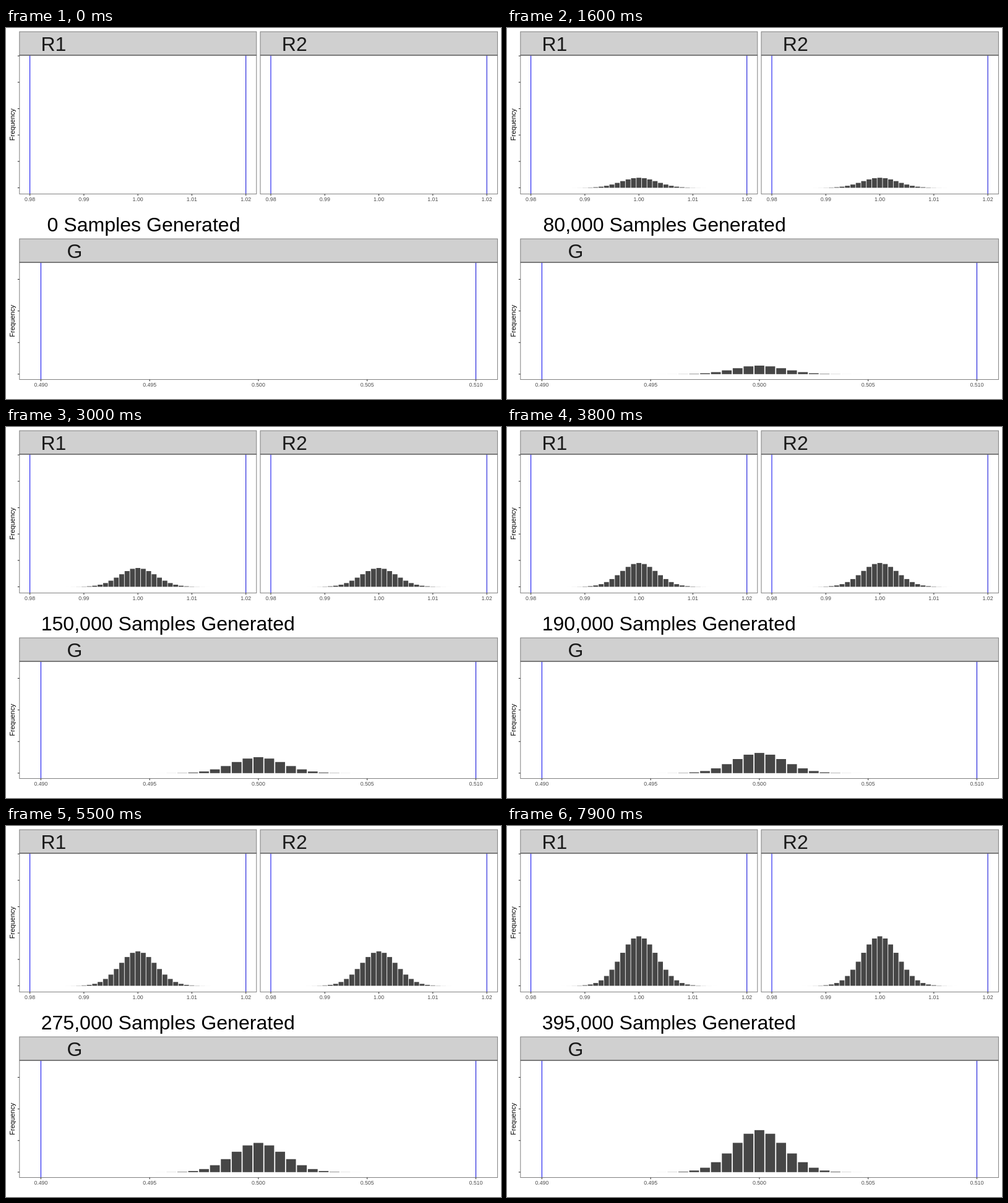
An HTML page that plays this animation: 800x600 px, repeating every 8000 ms.

```html
<!DOCTYPE html>
<html lang="en">
<head>
<meta charset="utf-8">
<title>Samples</title>
<style>
html, body { margin: 0; width: 100%; height: 100%; overflow: hidden; background: #fff; }
svg { display: block; width: 800px; height: 600px; font-family: "Liberation Sans", Arial, sans-serif; }
</style>
</head>
<body>
<svg id="stage" viewBox="0 0 800 600"></svg>
<script>
const stage = document.getElementById("stage");
const LOOP = 8000, STEP = 100, SAMPLES_PER_STEP = 5000;

function add(tag, attrs, text) {
  const el = document.createElementNS("http://www.w3.org/2000/svg", tag);
  for (const key in attrs) el.setAttribute(key, attrs[key]);
  if (text !== undefined) el.textContent = text;
  stage.appendChild(el);
  return el;
}

function line(x1, y1, x2, y2, stroke, width = 1.07) {
  add("line", { x1, y1, x2, y2, stroke, "stroke-width": width });
}

const resistor = {
  top: 6, bottom: 268.4, base: 258.4, tickGap: 42.65, tickCount: 6,
  binWidth: 8.73, sigma: 3.333, peak: 0.2025, reach: 14,
  labels: ["0.98", "0.99", "1.00", "1.01", "1.02"]
};
const panels = [
  { ...resistor, title: "R1", titleX: 56.5, left: 21.8, right: 404.8,
    first: 38.6, last: 387.7, showY: true },
  { ...resistor, title: "R2", titleX: 445.8, left: 411, right: 794.4,
    first: 428, last: 777.1 },
  { title: "G", titleX: 98.5, left: 21.8, right: 794.4, top: 341, bottom: 568.5,
    first: 56.4, last: 759.4, base: 559.8, tickGap: 51.1, tickCount: 4,
    binWidth: 17.575, sigma: 2.357, peak: 0.172, reach: 10, showY: true,
    labels: ["0.490", "0.495", "0.500", "0.505", "0.510"] }
];

function buildPanel(p) {
  const { left, right, top, bottom, first, last } = p;
  const width = right - left, bodyTop = top + 38;

  // Bars: gaussian bins, each filling 90% of its slot.
  const bars = [];
  for (let k = -p.reach; k <= p.reach; k++) {
    const share = Math.exp(-k * k / (2 * p.sigma ** 2)) * p.peak;
    const x = (first + last) / 2 + (k - 0.45) * p.binWidth;
    bars.push({ share, el: add("rect", { x, width: p.binWidth * 0.9, fill: "#464646" }) });
  }

  line(first, bodyTop, first, bottom, "#1010f0");
  line(last, bodyTop, last, bottom, "#1010d8");
  add("rect", { x: left, y: bodyTop, width, height: bottom - bodyTop,
    fill: "none", stroke: "#7f7f7f" });
  add("rect", { x: left, y: top, width, height: 38, fill: "#d0d0d0", stroke: "#7f7f7f" });
  line(left, bodyTop, right, bodyTop, "#555");
  add("text", { x: p.titleX, y: top + 31, "font-size": 32, fill: "#1a1a1a" }, p.title);

  p.labels.forEach((label, i) => {
    const x = first + (last - first) * i / (p.labels.length - 1);
    line(x, bottom, x, bottom + 2.8, "#333");
    add("text", { x, y: bottom + 11.6, "font-size": 8.8, fill: "#4d4d4d",
      "text-anchor": "middle" }, label);
  });

  if (p.showY) {
    for (let i = 0; i < p.tickCount; i++) {
      const y = p.base - i * p.tickGap;
      line(left - 3, y, left, y, "#333");
    }
    const middle = (bodyTop + bottom) / 2;
    add("text", { transform: `translate(13.6 ${middle}) rotate(-90)`, "font-size": 11,
      "text-anchor": "middle" }, "Frequency");
  }

  return thousands => bars.forEach(({ share, el }) => {
    const height = share * thousands;
    el.setAttribute("y", p.base - height);
    el.setAttribute("height", height);
  });
}

const updaters = panels.map(buildPanel);
const caption = add("text", { y: 329, "font-size": 32.1 });
let shown = -1;

function render(time) {
  const step = Math.floor((time % LOOP) / STEP);
  if (step === shown) return;
  shown = step;
  const samples = step * SAMPLES_PER_STEP;
  updaters.forEach(update => update(samples / 1000));
  caption.textContent = samples.toLocaleString("en-US") + " Samples Generated";
  // The caption is justified at one tenth of its own width.
  caption.setAttribute("x", 97.7 - 0.1 * caption.getComputedTextLength());
}

const start = performance.now();
function tick() {
  render(performance.now() - start);
  requestAnimationFrame(tick);
}
tick();
</script>
</body>
</html>
```
